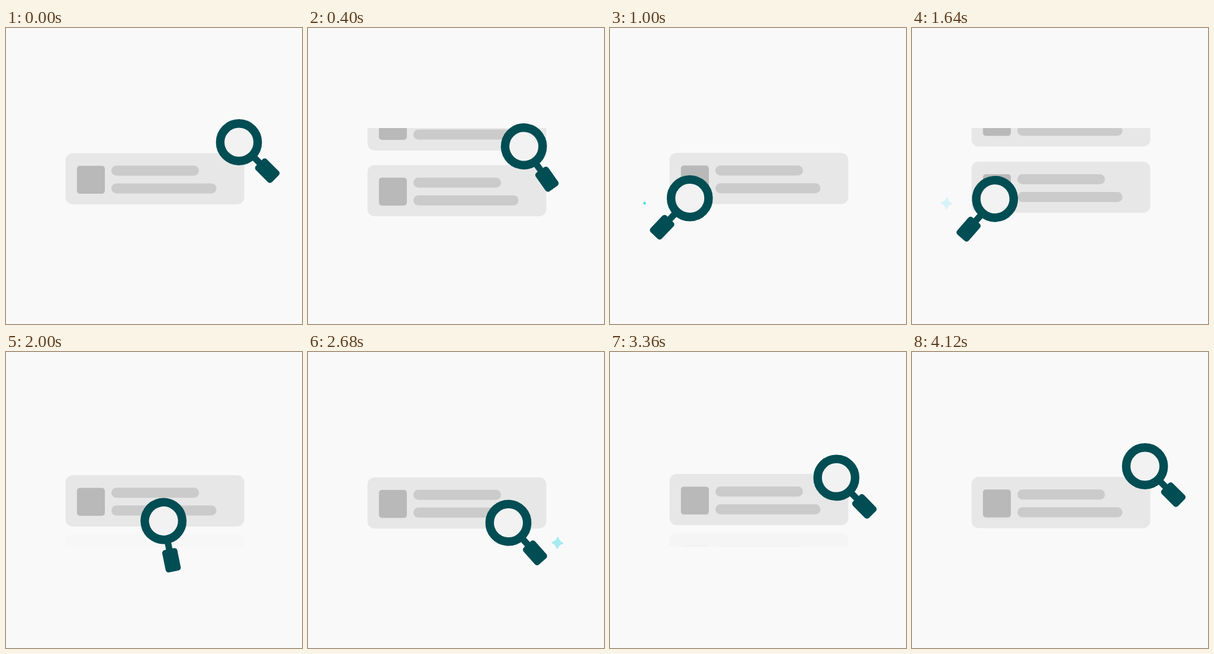
An HTML page that plays this animation: 500 by 500 pixels, repeating every 4200 ms.

```html
<!DOCTYPE html>
<html lang="en">
<head>
<meta charset="utf-8">
<title>Search list</title>
<style>
  html, body { margin: 0; width: 100%; height: 100%; overflow: hidden; background: #f9f9f9; }
  svg { display: block; width: 100%; height: 100%; }
</style>
</head>
<body>
<svg viewBox="0 0 500 500">
  <defs>
    <clipPath id="window"><rect x="90" y="169" width="330" height="159.5"/></clipPath>
    <g id="card">
      <rect x="100.5" width="302" height="86.5" rx="12" fill="#e7e7e7"/>
      <rect x="119.8" y="21.3" width="47.2" height="47.2" rx="5" fill="#b9b9b9"/>
      <rect x="178" y="21.2" width="148" height="17" rx="8.5" fill="#cbcbcb"/>
      <rect x="178" y="51.2" width="177.5" height="17" rx="8.5" fill="#cbcbcb"/>
    </g>
    <path id="star" d="M0-8.5Q1.8-1.8 8.5 0Q1.8 1.8 0 8.5Q-1.8 1.8-8.5 0Q-1.8-1.8 0-8.5Z"
      fill="#30d8ea" stroke="#30d8ea" stroke-width="3" stroke-linejoin="round"/>
  </defs>
  <g clip-path="url(#window)">
    <use class="card" href="#card"/>
    <use class="card" href="#card"/>
    <use class="card" href="#card"/>
  </g>
  <use class="star" href="#star"/>
  <use class="star" href="#star"/>
  <g id="lens" fill="#004d54">
    <rect x="36" y="-5.5" width="16" height="11"/>
    <rect x="48.5" y="-13" width="38.5" height="26" rx="5"/>
    <circle r="31.7" fill="#f2f2f2" stroke="#004d54" stroke-width="14.4"/>
  </g>
</svg>
<script>
const LOOP = 4200, STEP = 40;
const cards = document.querySelectorAll('.card');
const stars = document.querySelectorAll('.star');
const lens = document.getElementById('lens');

const clamp = v => Math.min(1, Math.max(0, v));
const mix = (a, b, f) => a + (b - a) * f;
const ease = (t, from, to) => {
  const u = clamp((t - from) / (to - from));
  return u * u * (3 - 2 * u);
};

// One list scroll: slight dip, fast rise past the end, slow settle.
function scroll(s) {
  if (s < 230) return -0.02 * ease(s, 0, 230);
  if (s < 575) return mix(-0.02, 1.08, ease(s, 230, 575));
  return mix(1.08, 1, ease(s, 575, 1010));
}
const scrollStarts = [-60, 1166, 2600];

function drawCards(t) {
  const start = scrollStarts.filter(s => s <= t).pop();
  const p = scroll(t - start);
  cards.forEach((card, i) => {
    const y = 211 + (i ? 100 * (i - p) : -114 * p);
    const alpha = i ? clamp((311 - y) / 23) : clamp((y - 100) / 12);
    card.setAttribute('transform', `translate(0 ${y})`);
    card.setAttribute('opacity', alpha);
  });
}

// Lens stops; bend holds y back along the way, lift raises the middle.
const home = { x: 393.5, y: 193, angle: 45 };
const left = { x: 131, y: 289.5, angle: 135 };
const right = { x: 338, y: 289.5, angle: 48.5 };
const moves = [
  { a: home, b: left, from: 229, to: 1059, bend: 0.38, lift: 0 },
  { a: left, b: right, from: 1544, to: 2300, bend: 0, lift: 4.5 },
  { a: right, b: home, from: 2620, to: 3658, bend: 0, lift: 0 }
];

function drawLens(t) {
  const { a, b, from, to, bend, lift } = moves.find(m => t < m.to) || moves[2];
  const f = ease(t, from, to), arc = f * (1 - f);
  const x = mix(a.x, b.x, f);
  const y = mix(a.y, b.y, f - bend * arc) - 4 * lift * arc;
  lens.setAttribute('transform', `translate(${x} ${y}) rotate(${mix(a.angle, b.angle, f)})`);
}

const sparkles = [{ x: 58.5, y: 296, from: 960 }, { x: 421.5, y: 322.5, from: 2080 }];

function drawStars(t) {
  sparkles.forEach(({ x, y, from }, i) => {
    const s = t - from;
    const size = 1 - (1 - clamp(s / 260)) ** 2;
    const alpha = s > 0 ? clamp(1 - (s - 410) / 320) : 0;
    const turn = mix(18, 4, size);
    stars[i].setAttribute('transform', `translate(${x} ${y}) rotate(${turn}) scale(${size})`);
    stars[i].setAttribute('opacity', alpha);
  });
}

function draw(now) {
  const t = Math.min(Math.floor(now % LOOP / STEP) * STEP, LOOP - 2 * STEP);
  drawCards(t);
  drawLens(t);
  drawStars(t);
}

let origin;
function tick(now) {
  origin ??= now;
  draw(now - origin);
  requestAnimationFrame(tick);
}
draw(0);
requestAnimationFrame(tick);
</script>
</body>
</html>
```
